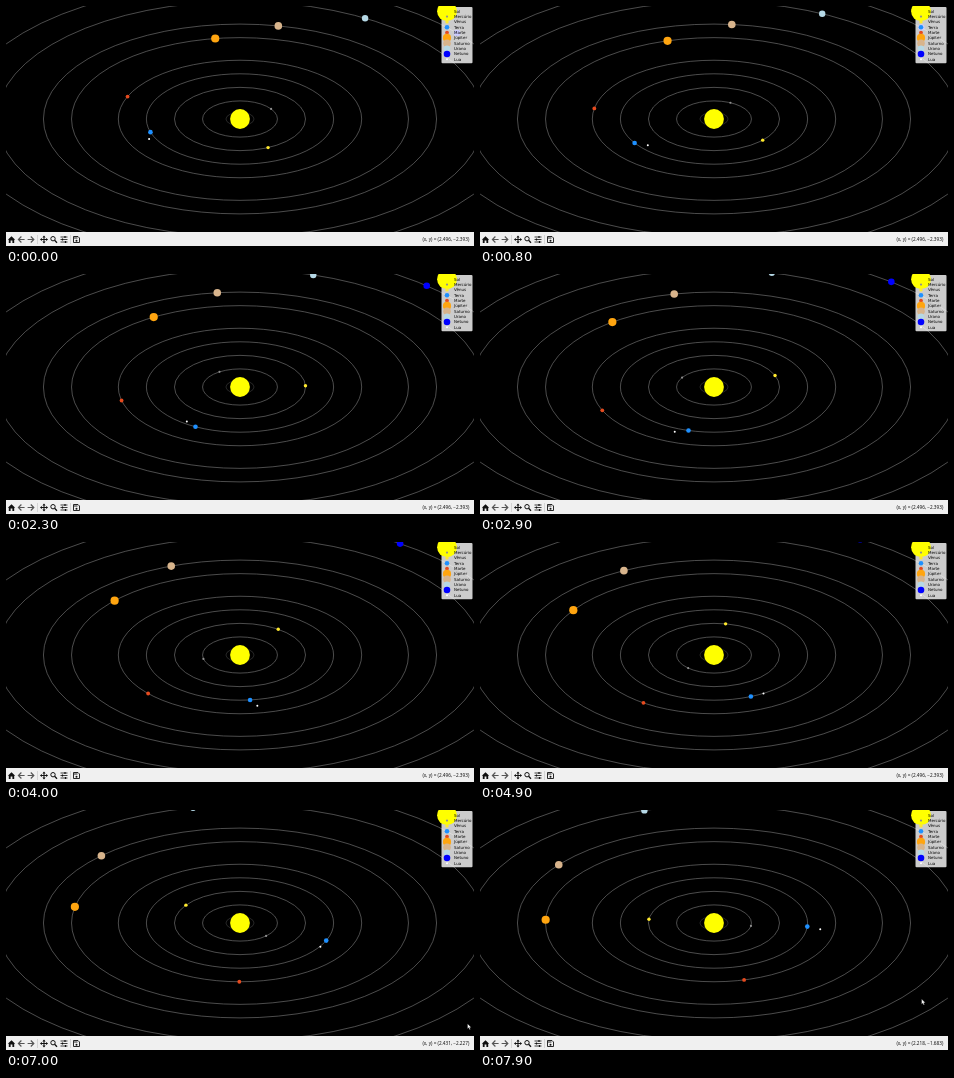
An HTML page that plays this animation: 468x240 px, repeating every 8000 ms.

```html
<!DOCTYPE html>
<html lang="pt">
<head>
<meta charset="utf-8">
<title>Sistema solar</title>
<style>
html, body { margin: 0; width: 100%; height: 100%; overflow: hidden; background: #000; }
svg { display: block; }
.orbits { fill: none; stroke: #7c7c7c; stroke-width: .62; }
.legend text { font: 4px "DejaVu Sans", sans-serif; }
#coords { font: 4.7px "Open Sans", sans-serif; text-anchor: end; }
.line { fill: none; stroke: #111; stroke-width: 1; }
</style>
</head>
<body>
<svg width="468" height="240" viewBox="0 0 468 240">
  <g class="orbits" id="orbits"></g>
  <g id="bodies"></g>
  <g class="legend" id="legend">
    <rect x="435.5" y="1" width="31" height="56.3" rx="1" fill="#fff" fill-opacity=".8"/>
  </g>
  <rect y="226" width="468" height="14" fill="#f0f0f0"/>
  <g id="tools">
    <path d="M1.8 233.8L5.5 230.2L9.2 233.8H8.2V237H6.4V234.6H4.6V237H2.8V233.8Z" fill="#111"/>
    <g class="line" style="stroke:#555;stroke-width:1.2">
      <path d="M18.6 233.5H12.6M15.4 230.5L12.4 233.5L15.4 236.5"/>
      <path d="M21.6 233.5H27.6M24.8 230.5L27.8 233.5L24.8 236.5"/>
    </g>
    <path d="M31.5 229V238M64.5 229V238" stroke="#c8c8c8" stroke-width=".7"/>
    <path class="line" d="M35 233.5H41M38 230.5V236.5"/>
    <path d="M38 229.4l1.6 2h-3.2zM38 237.6l1.6 -2h-3.2zM33.9 233.5l2 -1.6v3.2zM42.1 233.5l-2 -1.6v3.2z" fill="#111"/>
    <circle class="line" cx="47" cy="232.7" r="2.2"/>
    <path class="line" d="M48.6 234.3L51 236.8" style="stroke-width:1.3"/>
    <path class="line" d="M54.5 231H61.5M54.5 233.5H61.5M54.5 236H61.5" style="stroke-width:.8"/>
    <path class="line" d="M59 230V232M56.5 232.5V234.5M59.5 235V237" style="stroke-width:1.2"/>
    <path class="line" d="M67.5 230.5H72L73.5 232V236.5H67.5ZM68 232H71.5" style="stroke-width:.9"/>
    <circle cx="70.5" cy="234.7" r="1" fill="#111"/>
  </g>
  <text id="coords" x="463.3" y="235"></text>
  <path id="cursor" d="M0 0V5.2L1.2 4.1L2 6L2.9 5.6L2.1 3.8H3.7Z" fill="#fff" stroke="#000" stroke-width=".3"/>
</svg>
<script>
// axes of 468 by 226 px, both spanning -2.5 to 2.5
const CX = 234, CY = 113, UX = 468 / 5, UY = 226 / 5;
// name, orbit radius, angular rate, dot radius, colour
const bodies = [
  ['Sol', 0, 0, 9.9, '#ff0'],
  ['Mercúrio', .4, 4, 1.1, '#909090'],
  ['Vênus', .7, 3, 1.7, '#ffe92e'],
  ['Terra', 1, 2, 2.3, '#1e90ff'],
  ['Marte', 1.3, 1.6, 1.9, '#e64a1e'],
  ['Júpiter', 1.8, 1, 4.1, '#ffa510'],
  ['Saturno', 2.1, .8, 3.8, '#d8b48c'],
  ['Urano', 2.6, .6, 3.2, '#b5d8e6'],
  ['Netuno', 3, .4, 3.3, '#00f'],
  ['Lua', .15, 10, 1, '#fff']
];
// time in ms, base angle in degrees
const pace = [[0, 98.45], [1700, 114.5], [2900, 127.1], [4000, 138.1],
  [4900, 146.6], [6100, 159.4], [7900, 177.7]];

const $ = id => document.getElementById(id);
function add(parent, tag, attrs, text = '') {
  const el = document.createElementNS('http://www.w3.org/2000/svg', tag);
  for (const key in attrs) el.setAttribute(key, attrs[key]);
  el.textContent = text;
  return parent.appendChild(el);
}

const dots = bodies.map(([name, orbit, , r, fill], i) => {
  const y = 5.2 + 5.35 * i;
  if (orbit) add($('orbits'), 'ellipse', {
    cx: CX, cy: CY, rx: orbit * UX, ry: orbit * UY, opacity: name === 'Lua' ? .5 : 1
  });
  add($('legend'), 'circle', { cx: 441, cy: y, r, fill });
  add($('legend'), 'text', { x: 448, y: y + 1.4 }, name);
  return add($('bodies'), 'circle', { r, fill });
});

function baseAngle(t) {
  const i = Math.max(1, pace.findIndex(p => p[0] >= t));
  const [t0, a0] = pace[i - 1], [t1, a1] = pace[i];
  return a0 + (a1 - a0) * (t - t0) / (t1 - t0);
}

function movePointer(t) {
  const p = Math.min(1, Math.max(0, (t - 6900) / 800));
  const k = 1 - (1 - p) ** 2;
  const x = 2.496 - .278 * k, y = -2.393 + .71 * k;
  $('coords').textContent = `(x, y) = (${x.toFixed(3)}, −${(-y).toFixed(3)})`;
  $('cursor').setAttribute('transform', `translate(${CX + x * UX} ${CY - y * UY})`);
  $('cursor').setAttribute('visibility', p > 0 ? 'visible' : 'hidden');
}

function draw(now) {
  const t = Math.floor(now % 8000 / 100) * 100;
  const base = baseAngle(t) * Math.PI / 180;
  const place = ([, orbit, rate]) => [orbit * Math.cos(rate * base), orbit * Math.sin(rate * base)];
  const earth = place(bodies[3]);
  bodies.forEach((body, i) => {
    let [x, y] = place(body);
    if (body[0] === 'Lua') { x += earth[0]; y += earth[1]; }
    dots[i].setAttribute('cx', CX + x * UX);
    dots[i].setAttribute('cy', CY - y * UY);
  });
  movePointer(t);
}

const start = performance.now();
function tick() {
  draw(performance.now() - start);
  requestAnimationFrame(tick);
}
tick();
</script>
</body>
</html>
```
